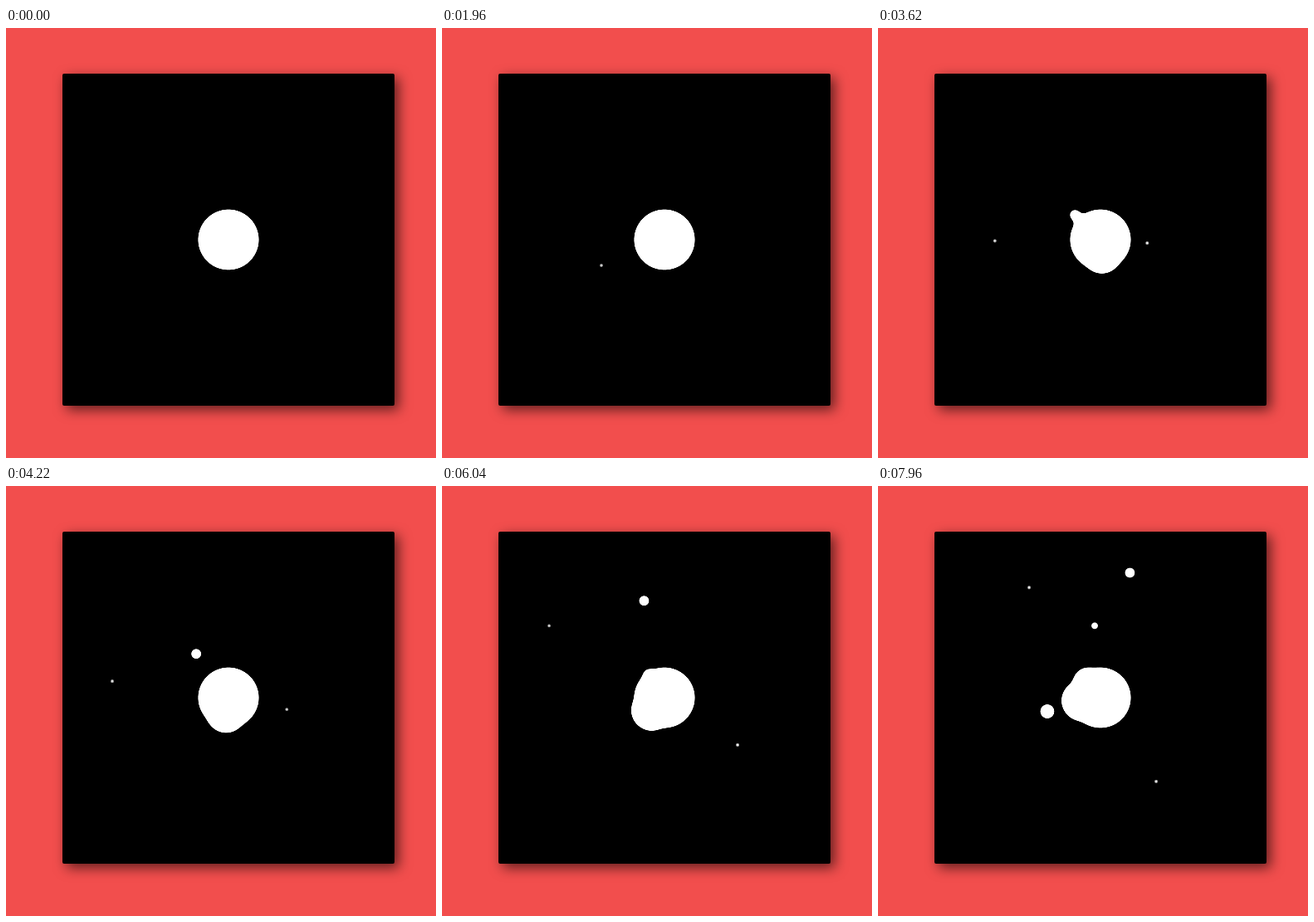
Animation, 518 px wide and 518 px high, one loop 8000 ms. Source, as an HTML page:

```html
<!DOCTYPE html>
<html lang="en">
<head>
<meta charset="utf-8">
<title>Gooey orbits</title>
<style>
  html, body { margin: 0; width: 100%; height: 100%; overflow: hidden; background: #f24e4d; }
  svg {
    position: absolute; left: 68px; top: 55px; width: 400px; height: 400px;
    background: #000; border-radius: 2px; box-shadow: 5px 5px 15px rgba(0, 0, 0, .6);
  }
</style>
</head>
<body>
<svg viewBox="0 0 400 400">
  <filter id="goo" filterUnits="userSpaceOnUse" x="0" y="0" width="400" height="400" color-interpolation-filters="sRGB">
    <feGaussianBlur stdDeviation="4"/>
    <feColorMatrix values="1 0 0 0 0  0 1 0 0 0  0 0 1 0 0  0 0 0 20 -8"/>
  </filter>
  <g id="bodies" filter="url(#goo)" fill="#fff">
    <rect width="400" height="400" fill="none"/>
    <circle cx="200" cy="200" r="36.1"/>
  </g>
</svg>
<script>
const LOOP = 8000;
const SPEED = 360 / 14; // degrees per second

// Orbit centre (x, y) from the middle, orbit radius, angle `deg` at time `at`,
// body size, and the time it is born inside the core (seconds).
const orbits = [
  { x: -62.3, y: -52,   radius: 84.1, deg: 99.4,  at: 1.96, size: 4.73, born: 0 },
  { x: 29.7,  y: 56.1,  radius: 58.4, deg: -75.8, at: 3.06, size: 4.73, born: 1.4 },
  { x: 42.1,  y: -68.3, radius: 82.4, deg: 169.2, at: 4.22, size: 6.7,  born: 2.34 },
  { x: 48.8,  y: -44.1, radius: 70.2, deg: 192.7, at: 7,    size: 5.48, born: 4.87 },
  { x: -50.8, y: -64.4, radius: 82,   deg: 99.3,  at: 7.96, size: 8.7,  born: 6.11 },
  { x: -6.2,  y: 1.9,   radius: 16.2, deg: 78,    at: 4.22, size: 24.2, born: 1.9 },
  { x: 4,     y: -11.5, radius: 20,   deg: 199,   at: 7.96, size: 18,   born: 3 }
];

// Bursts of updates: first change, last change, number of changes.
const bursts = [
  [440, 1380, 18], [1960, 2820, 6], [3060, 4060, 9], [4220, 4620, 3],
  [4900, 5900, 7], [6040, 7000, 6], [7260, 7960, 5]
];

const group = document.getElementById('bodies');
for (const o of orbits) {
  o.el = document.createElementNS('http://www.w3.org/2000/svg', 'circle');
  group.append(o.el);
}

// The motion is stepped: hold each pose until the next update.
function heldTime(ms) {
  let held = 0;
  for (const [from, to, count] of bursts) {
    if (ms < from) break;
    const step = (to - from) / (count - 1);
    held = ms >= to ? to : from + Math.floor((ms - from) / step) * step;
  }
  return held;
}

function draw(ms) {
  const t = heldTime(ms) / 1000;
  for (const o of orbits) {
    const a = (o.deg + (t - o.at) * SPEED) * Math.PI / 180;
    o.el.setAttribute('cx', 200 + o.x + o.radius * Math.cos(a));
    o.el.setAttribute('cy', 200 + o.y + o.radius * Math.sin(a));
    o.el.setAttribute('r', t < o.born ? 0 : o.size);
  }
}

const start = performance.now();
function tick() {
  draw((performance.now() - start) % LOOP);
  requestAnimationFrame(tick);
}
tick();
</script>
</body>
</html>
```
